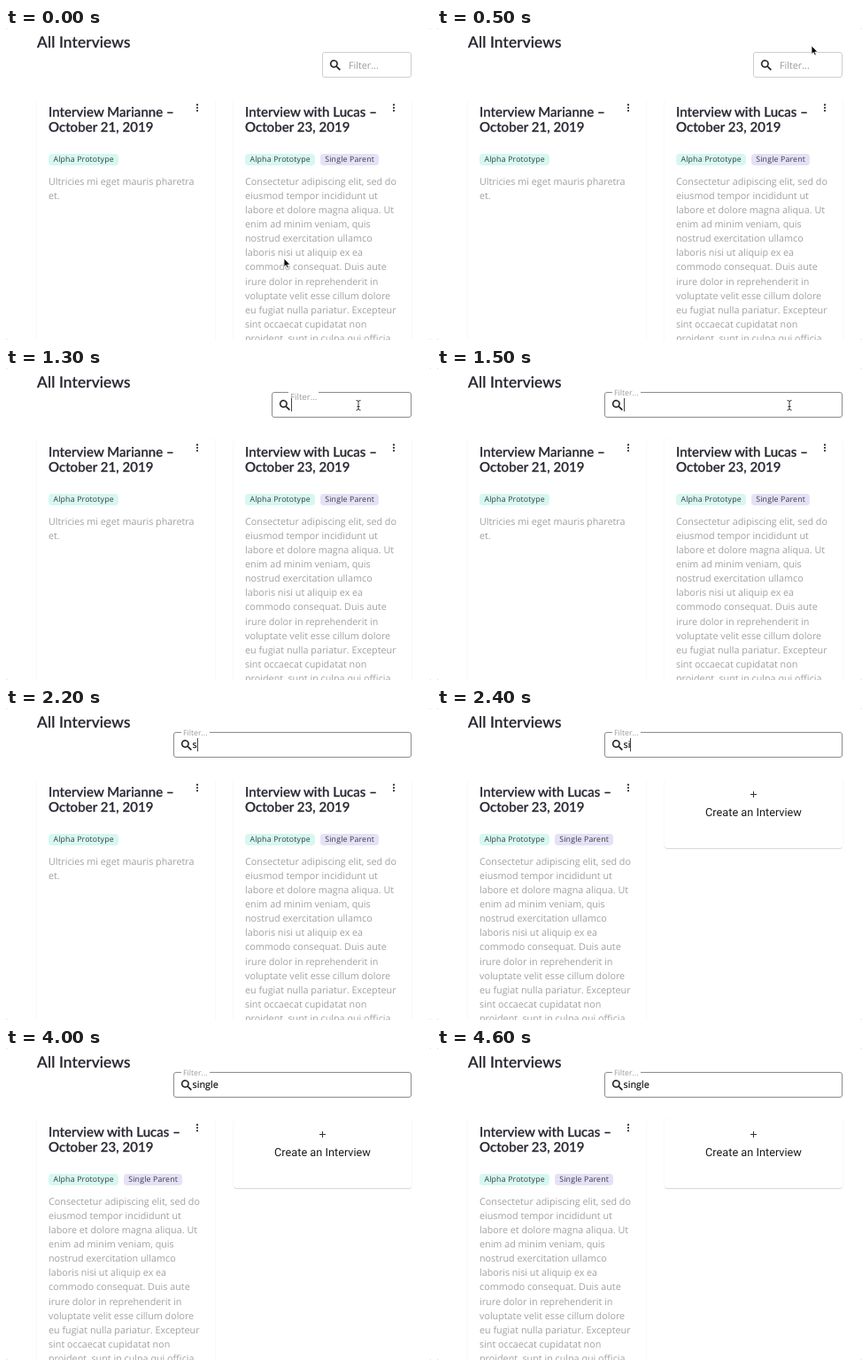
These frames come from a looping animation (480x352 px, 5 s). An HTML page:

```html
<!DOCTYPE html>
<html lang="en">
<head>
<meta charset="utf-8">
<title>All Interviews</title>
<style>
  html, body { margin: 0; width: 100%; height: 100%; overflow: hidden; background: #e2e2e2; }
  #stage {
    --text: 10.77px;
    position: relative; width: 480px; height: 352px; overflow: hidden;
    background: #fff; border-radius: 3px;
    font: var(--text)/16.15px "Open Sans", "Noto Sans", sans-serif;
    text-rendering: geometricPrecision; white-space: pre;
  }
  #stage *, #stage { box-sizing: border-box; }
  #stage > *, .card > *, .field > *, .cursor > * { position: absolute; }
  h1, h2, p { margin: 0; }
  h1, h2 {
    font-family: Lato, "Open Sans", sans-serif; font-weight: 500;
    color: #24242e; -webkit-text-stroke: .3px #24242e;
  }
  h1 { left: 35px; top: 6px; font-size: 17.3px; line-height: 20px; letter-spacing: .14px; }

  /* Every part shares one stepped five second clock */
  .loop { animation: 5s step-end infinite; }

  .card {
    top: 80px; width: 201px; height: 300px; border-radius: 3px; background: #fff;
    box-shadow: 0 1.3px .7px -.7px rgba(0,0,0,.13), 0 .7px .7px rgba(0,0,0,.05), 0 .7px 2px rgba(0,0,0,.09);
  }
  .first { left: 35px; animation-name: leave; }
  .second { left: 257px; animation-name: shift; }
  .create { left: 257px; height: 78px; animation-name: enter; color: #1c1c1c; }
  @keyframes leave { 0% { visibility: visible } 48%, 100% { visibility: hidden } }
  @keyframes enter { 0% { visibility: hidden } 48%, 100% { visibility: visible } }
  @keyframes shift { 0% { transform: none } 48%, 100% { transform: translateX(-222px) } }

  h2 { left: 13px; top: 7.2px; font-size: 15px; line-height: 16.8px; letter-spacing: .04px; }
  .card p { left: 13px; top: 85.5px; color: #a1a1a1; }
  .dots { left: 178.5px; top: 4px; width: 4px; height: 12px; fill: #222; }
  .tags { left: 13px; top: 62px; display: flex; gap: 5.5px; }
  .tags span {
    height: 13px; padding: 0 5.5px; border-radius: 4px;
    font-size: 8.75px; line-height: 13px; letter-spacing: .17px; color: #3a3d47; background: #d6f8f0;
  }
  .tags span + span { background: #e5e1f6; }
  .plus { left: 97px; top: 13.5px; width: 7px; height: 7px; stroke: #333; }
  .create b { left: 0; right: 0; top: 31px; text-align: center; font: 400 12.75px/16px Roboto, sans-serif; }

  .field {
    left: 357px; right: 22px; top: 27px; height: 29px;
    border: 1px solid #cecece; border-radius: 3px; animation-name: widen;
  }
  @keyframes widen {
    0% { left: 357px; border-color: #cecece }
    26% { left: 300px; border-color: #8c8c8c }
    28% { left: 210px; border-color: #8c8c8c }
    30%, 100% { left: 189px; border-color: #8c8c8c }
  }
  .search {
    left: 5.6px; top: 6px; width: 16.15px; height: 16.15px;
    fill: #111; stroke: #111; stroke-width: .4;
  }
  .label { left: 27px; top: 6.5px; padding: 0 2px; line-height: 15px; color: #9a9a9a; background: #fff; animation-name: float; }
  @keyframes float {
    0% { left: 27px; top: 6.5px; font-size: 10.77px; line-height: 15px }
    26% { left: 18px; top: -2px; font-size: 9.7px; line-height: 13px }
    28%, 100% { left: 8px; top: -6px; font-size: 8.75px; line-height: 12px }
  }

  .typed { left: 20.6px; top: 6px; height: 15px; display: flex; line-height: 15px; color: #111; animation-name: type; }
  .typed span {
    font-size: calc(clamp(0, var(--n) - var(--i), 1) * var(--text));
    -webkit-text-stroke: .2px #111;
  }
  .typed i { width: 1px; height: 15px; background: #444; animation-name: blink; }
  @keyframes type {
    0% { --n: 0 } 40% { --n: 1 } 48% { --n: 2 } 50% { --n: 3 }
    54% { --n: 4 } 58% { --n: 5 } 62%, 100% { --n: 6 }
  }
  @keyframes blink {
    0%, 36%, 72%, 92%, 100% { opacity: 0 }
    26%, 40%, 82% { opacity: 1 }
  }

  .cursor { left: 0; top: 0; animation-name: move; }
  .cursor svg { overflow: visible; width: 1px; height: 1px; left: 0; top: 0; }
  .arrow { fill: #000; stroke: #fff; stroke-width: .8; animation-name: point; }
  .beam { fill: none; stroke: #222; stroke-width: .9; animation-name: beam; }
  @keyframes move {
    0% { transform: translate(314px, 260px) }
    2% { transform: translate(323px, 238px) }
    4% { transform: translate(350px, 180px) }
    6% { transform: translate(385px, 102px) }
    8% { transform: translate(412px, 46px) }
    10% { transform: translate(423px, 20px) }
    12% { transform: translate(419px, 33px) }
    14% { transform: translate(414px, 38px) }
    16% { transform: translate(408px, 41px) }
    18% { transform: translate(404px, 42px) }
    20% { transform: translate(403px, 42px) }
    22% { transform: translate(400px, 42px) }
    24%, 100% { transform: translate(398px, 42px) }
  }
  @keyframes point { 0% { visibility: visible } 12%, 100% { visibility: hidden } }
  @keyframes beam { 0%, 40%, 100% { visibility: hidden } 12% { visibility: visible } }
</style>
</head>
<body>
<main id="stage">
  <h1>All Interviews</h1>

  <section class="card first loop">
    <h2>Interview Marianne –
October 21, 2019</h2>
    <svg class="dots" viewBox="0 0 4 12"><circle cx="2" cy="2.7" r="1.1"/><circle cx="2" cy="6" r="1.1"/><circle cx="2" cy="9.3" r="1.1"/></svg>
    <div class="tags"><span>Alpha Prototype</span></div>
    <p>Ultricies mi eget mauris pharetra
et.</p>
  </section>

  <section class="card create loop">
    <svg class="plus" viewBox="0 0 7 7"><path d="M3.5 0V7M0 3.5H7"/></svg>
    <b>Create an Interview</b>
  </section>

  <section class="card second loop">
    <h2>Interview with Lucas –
October 23, 2019</h2>
    <svg class="dots" viewBox="0 0 4 12"><circle cx="2" cy="2.7" r="1.1"/><circle cx="2" cy="6" r="1.1"/><circle cx="2" cy="9.3" r="1.1"/></svg>
    <div class="tags"><span>Alpha Prototype</span><span>Single Parent</span></div>
    <p>Consectetur adipiscing elit, sed do
eiusmod tempor incididunt ut
labore et dolore magna aliqua. Ut
enim ad minim veniam, quis
nostrud exercitation ullamco
laboris nisi ut aliquip ex ea
commodo consequat. Duis aute
irure dolor in reprehenderit in
voluptate velit esse cillum dolore
eu fugiat nulla pariatur. Excepteur
sint occaecat cupidatat non
proident, sunt in culpa qui officia</p>
  </section>

  <div class="field loop">
    <span class="label loop">Filter...</span>
    <svg class="search" viewBox="0 0 24 24"><path d="M15.5 14h-.79l-.28-.27A6.5 6.5 0 1 0 13.73 14.43l.27.28v.79l5 4.99L20.49 19zM9.5 14a4.5 4.5 0 1 1 0-9 4.5 4.5 0 0 1 0 9z" fill-rule="evenodd"/></svg>
    <div class="typed loop"><span style="--i:0">s</span><span style="--i:1">i</span><span style="--i:2">n</span><span style="--i:3">g</span><span style="--i:4">l</span><span style="--i:5">e</span><i class="loop"></i></div>
  </div>

  <div class="cursor loop">
    <svg class="arrow loop"><path d="M0 0V9.6L2.2 7.6L3.7 11L5.3 10.3L3.8 7H6.9Z"/></svg>
    <svg class="beam loop"><path d="M-2.5-5.5Q0-5.5 0-4V4Q0 5.5-2.5 5.5M2.5-5.5Q0-5.5 0-4M0 4Q0 5.5 2.5 5.5M-1.5 1.5H1.5"/></svg>
  </div>
</main>
</body>
</html>
```
